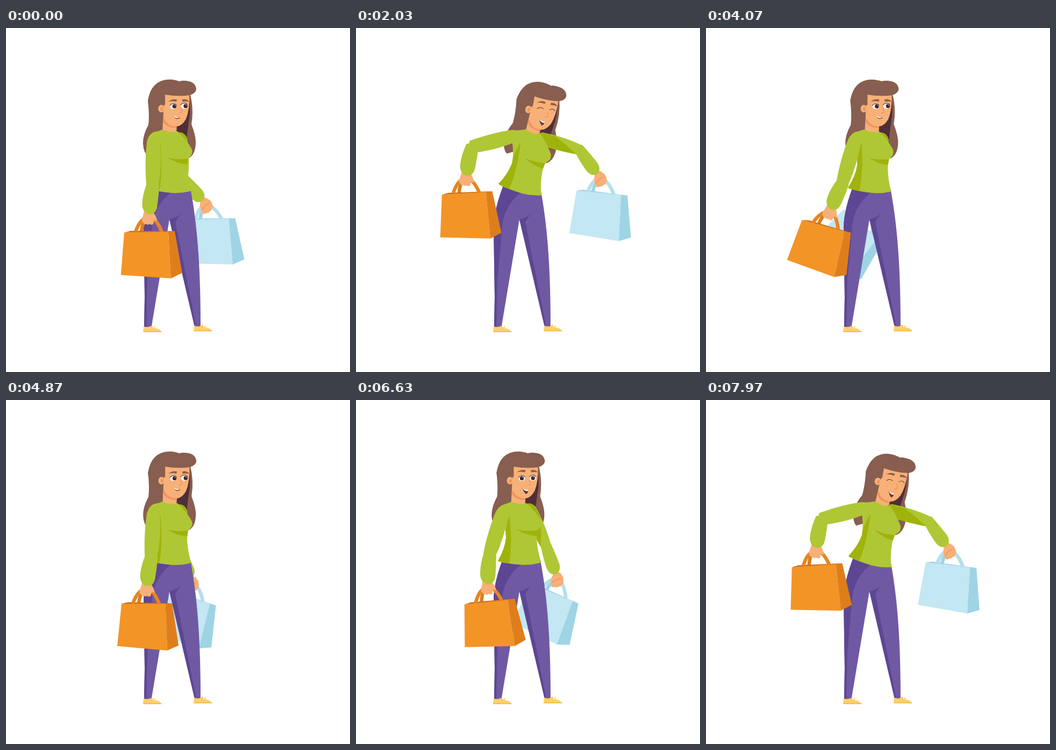
Animation of 640x640 px, one loop 8 s. Source, as an HTML page:

```html
<!DOCTYPE html>
<html lang="en">
<head>
<meta charset="utf-8">
<title>Shopper with two bags</title>
<style>
  html, body { margin: 0; width: 100%; height: 100%; overflow: hidden; background: #fff; }
  svg { display: block; width: 100vw; height: 100vh; }
  .hair { fill: #875e50; }
  .hairDark { fill: #4f2e3a; }
  .skin { fill: #f7b077; }
  .blush { fill: #f0935f; }
  .green { fill: #afc735; }
  .greenDark { fill: #a0b30a; }
  .purple { fill: #7059a3; }
  .purpleDark { fill: #5d4693; }
  .shoe { fill: #ffd069; }
  .ink { fill: #3d2232; }
  .line { fill: none; stroke-linecap: round; stroke-linejoin: round; }
  .crease { stroke: #ea8f5a; stroke-width: 1.2; }
  .lid { stroke: #6f4637; stroke-width: 1.2; }
  .strap { fill: none; stroke-width: 6.5; }
</style>
</head>
<body>
<svg viewBox="0 0 640 640">
  <defs>
    <g id="shoe">
      <path class="shoe" d="M256 555Q264 559 271 554L274 558Q286 559 289 565L255 565Z"/>
      <path class="line" stroke="#f3b13f" stroke-width="1.3" d="M256 565H289M270 557L272 554M275 558L277 555"/>
    </g>
  </defs>

  <g id="blueBag">
    <path class="strap" stroke="#9fd4e5" stroke-width="5" d="M-12 23Q-9 4 -2 -2"/>
    <path fill="#9fd4e5" d="M-42 24L-30 21L53 23L41 24Z"/>
    <path fill="#c3e7f3" d="M-42 24L41 23L46 109L-47 104Z"/>
    <path fill="#9fd4e5" d="M41 23L53 23L68 100L46 109Z"/>
    <path class="strap" stroke="#b4dfec" d="M-21 24Q-14 -3 1 -3Q15 -1 28 24"/>
  </g>

  <g id="head">
    <path class="hair" d="M303 96Q270 97 264 135Q267 162 265 180Q254 200 255 216Q256 232 264 238L300 220L335 214L338 243Q353 237 353 212Q353 200 345 179Q350 150 342 120L320 98Z"/>
    <path class="hairDark" d="M339 125Q345 150 340 175Q337 195 336 210L317 192L317 180Q338 172 339 125Z"/>
    <path class="skin" d="M293 155L291 194Q305 202 317 195L318 178Z"/>
    <path class="blush" d="M293 166Q300 184 318 183L317 186Q300 186 293 175Z"/>
    <path class="skin" d="M295 122L341 124Q342 152 335 169Q328 182 318 183Q302 181 293 164Z"/>
    <ellipse class="skin" cx="289" cy="150" rx="5.8" ry="7"/>
    <ellipse class="blush" cx="290" cy="150.5" rx="2.4" ry="3.6"/>
    <path class="hair" d="M265 143L296 143L296 124Q320 128 342 125Q354 121 354 113Q352 98 330 98Q323 98 321 100Q312 95 303 96Q272 97 264 135Z"/>
    <g id="brows" class="hair">
      <path d="M302 137Q309 131 318 133L317 137Q309 135 302 137Z"/>
      <path d="M328 133Q336 131 341 137Q335 136 328 137Z"/>
    </g>
    <g id="openEyes">
      <ellipse cx="311" cy="145.5" rx="6" ry="5.2" fill="#fff"/>
      <ellipse cx="331.5" cy="145" rx="6" ry="5.2" fill="#fff"/>
      <path class="line lid" d="M305 144Q310 138 317 143M325 143Q331 137 337 142"/>
      <g id="pupils">
        <circle class="ink" cx="313.3" cy="145.7" r="3.7"/>
        <circle class="ink" cx="334" cy="145.2" r="3.7"/>
        <circle cx="314.5" cy="144" r=".8" fill="#fff"/>
        <circle cx="335" cy="143.5" r=".8" fill="#fff"/>
      </g>
    </g>
    <path id="shutEyes" class="line lid" d="M305 145.5Q310 140 316 144M328 144Q334 139 338 144"/>
    <path class="line crease" d="M325 149L327 157L322 158.5"/>
    <g id="smile">
      <path fill="#fff" d="M313 163Q317 166 323 167L321 169Q315 169 313 163Z"/>
      <path class="line" stroke="#6d2f2f" stroke-width="1.3" d="M315 167Q319 170 323 167"/>
    </g>
    <g id="laugh">
      <path fill="#6b3a35" d="M312 163Q317 167 323 167Q323 174 318.500 175Q314 171 312 163Z"/>
      <path fill="#fff" d="M312 163Q317 167 323 167L322.500 169.500Q315 170 312 163Z"/>
    </g>
  </g>

  <g id="rightHand">
    <path class="skin" d="M-6 -16Q0 -19 6 -15L11 -8Q13 0 11 6L8 7Q8 11 3 10Q0 13 -4 11Q-10 13 -11 8Q-13 0 -10 -7Z"/>
    <path class="line crease" d="M-9 3Q-2 -4 7 -4"/>
  </g>
  <g id="rightUpper">
    <path class="green" d="M-8 -10Q-12 40 -9 75L10 75Q17 40 15 0Q8 -16 -8 -10Z"/>
    <path class="greenDark" d="M-8 -10Q8 -16 14 -2L14 24Q4 48 -9 71Q-12 40 -8 -10Z"/>
  </g>
  <g id="rightFore">
    <path class="green" d="M-9 0Q-12 25 -11 42Q-9 55 1 56Q13 55 14 40Q13 20 10 -5Q0 -9 -9 0Z"/>
  </g>

  <path class="purple" d="M277 286Q257 335 256 370L258 500L257 556Q264 558 271 554L304 356L351 556Q357 558 362 554Q362 430 351 348Q347 318 343 298Z"/>
  <path class="purpleDark" d="M277 286Q257 335 256 370L258 500L257 556L261 556L263 470L271 380Q272 330 312 302Z"/>
  <path class="purpleDark" d="M304 356Q316 353 325 346Q319 353 315 361L354 556L351 556Z"/>
  <use href="#shoe"/>
  <use href="#shoe" x="94" y="-1.5"/>

  <g id="torso">
    <path class="green" d="M291 189Q305 196 319 192Q335 207 345 224Q350 235 338 243Q336 258 338 272Q340 290 345 303Q322 309 300 306Q281 304 264 299Q278 275 280 255Q279 235 270 212Q267 196 280 193Z"/>
    <path class="greenDark" d="M287 214Q278 240 280 255Q278 275 264 299Q275 303 285 304Q292 270 287 214Z"/>
    <path class="greenDark" d="M300 241Q318 246 339 243L337 254Q317 252 300 241Z"/>
  </g>

  <g id="orangeBag">
    <path class="strap" stroke="#de7e1b" stroke-width="5" d="M-14 23Q-12 6 -5 -2"/>
    <path fill="#c96d12" d="M-46 25L-34 22L48 22L36 24Z"/>
    <path fill="#f39427" d="M-46 25L36 23L41 110L-52 104Z"/>
    <path fill="#de7e1b" d="M36 23L48 22L62 100L41 110Z"/>
    <path class="strap" stroke="#e68521" d="M-25 24Q-16 -3 1 -4Q13 -3 24 24"/>
  </g>
  <g id="leftHand">
    <path class="skin" d="M-9 -15L6 -15Q14 -6 15 2Q14 5 10 1L8 9Q4 12 1 9Q-2 12 -5 9Q-9 11 -10 7Q-15 4 -12 -3Z"/>
  </g>
  <g id="leftUpper">
    <path class="green" d="M10 -17Q-9 -18 -13 4Q-16 42 -11 84Q0 90 12 84Q18 40 9 -8Z"/>
  </g>
  <g id="leftFore">
    <path class="green" d="M-10 -3Q-17 22 -15 40Q-12 54 0 55Q12 54 13 39Q14 20 13 0Q2 -9 -10 -3Z"/>
  </g>
</svg>
<script>
const LOOP = 8000, CYCLE = 6000;
const LAUGH = { from: 1100, to: 3600 };

// Key poses: time, body lean, then upper arm and forearm angles, left and right
const POSES = [
  [0, 0, 2, 5.5, -5, -40],        // rest
  [630, -2, 18, 2, -26, -18],     // arms part
  [2030, 25, 77, 9, -76, -35],    // arms lifted
  [2540, 31, 65, 21, -60, -38],   // lean on
  [3170, 34, 45, 43, -5, -24],    // twist
  [4070, 3.5, 17, 22, 8, 10],     // swing behind
  [5050, 0, 3, 6, -2, -28],       // settle
  [5670, 0, 2, 6, -5, -47]        // swing out
];

const parts = {};
document.querySelectorAll('svg > g, #head [id]').forEach(el => parts[el.id] = el);

const clamp = x => Math.min(1, Math.max(0, x));

const pose = i => {
  const n = POSES.length, turn = Math.floor(i / n), [at, ...rest] = POSES[i - turn * n];
  return [at + turn * CYCLE, ...rest];
};

// Monotone cubic through the poses, wrapping around the cycle
function sample(time) {
  const i = POSES.findLastIndex(p => p[0] <= time);
  const [a, b, c, d] = [i - 1, i, i + 1, i + 2].map(pose);
  const span = c[0] - b[0], u = (time - b[0]) / span;
  const slope = (p, q, k) => (q[k] - p[k]) / (q[0] - p[0]);
  const tangent = (s, t) => s * t <= 0 ? 0 : 2 * s * t / (s + t);
  return b.slice(1).map((from, j) => {
    const k = j + 1, s = slope(b, c, k);
    const start = tangent(slope(a, b, k), s) * span;
    const end = tangent(s, slope(c, d, k)) * span;
    return from + (c[k] - from) * u * u * (3 - 2 * u)
      + start * u * (1 - u) ** 2 - end * u * u * (1 - u);
  });
}

const place = (id, [x, y], angle) =>
  parts[id].setAttribute('transform', `translate(${x} ${y}) rotate(${angle})`);
const show = (id, on) => parts[id].style.display = on ? '' : 'none';
const reach = ([x, y], length, angle) => {
  const r = angle * Math.PI / 180;
  return [x - length * Math.sin(r), y + length * Math.cos(r)];
};

function drawArm(side, [x, y], [upperLength, foreLength], upper, fore, wrist, bagId, bag) {
  // A lifted arm raises its shoulder
  const shoulder = [x, y - Math.abs(upper) * .04];
  const elbow = reach(shoulder, upperLength, upper);
  const hand = reach(elbow, foreLength, fore);
  place(side + 'Upper', shoulder, upper);
  place(side + 'Fore', elbow, fore);
  place(side + 'Hand', hand, fore + wrist);
  place(bagId, hand, bag);
}

function drawFace(time) {
  const laughing = time > LAUGH.from && time < LAUGH.to;
  const lift = clamp((time - 200) / 400) * clamp((LAUGH.to + 300 - time) / 400);
  show('openEyes', !laughing);
  show('shutEyes', laughing);
  show('smile', lift < .4);
  show('laugh', lift >= .4);
  parts.brows.setAttribute('transform', `translate(0 ${-2.5 * lift})`);
  parts.pupils.setAttribute('transform', `translate(${-2.2 * lift} 0)`);
}

function draw(now) {
  const time = now % LOOP % CYCLE;
  const [lean, leftUpper, leftFore, rightUpper, rightFore] = sample(time);
  const tilt = lean * .0085, sink = lean * lean / 250;
  const turn = Math.max(0, (lean + leftUpper - 20) / 8);

  // The torso shears around the hips
  const onTorso = (x, y) => {
    const up = (303 - y) / 114;
    return [x + lean * up, y + tilt * (x - 305) + sink * up];
  };
  const [e, f] = onTorso(0, 0);
  parts.torso.setAttribute('transform',
    `matrix(1 ${tilt} ${-lean / 114} ${1 - sink / 114} ${e} ${f})`);
  parts.head.setAttribute('transform',
    `translate(${lean * 1.27} ${sink * .6}) rotate(${turn} 289 150)`);

  // Bags follow the forearms; the body twist holds the blue one back
  const orange = leftFore * 1.05 - leftUpper * .08 - 5.5;
  const blue = rightFore + 41 - leftFore * .5 + leftUpper * .06;
  drawArm('left', onTorso(275, 209), [83, 64], leftUpper, leftFore, -5, 'orangeBag', orange);
  drawArm('right', onTorso(322, 206), [74, 69], rightUpper, rightFore, 19, 'blueBag', blue);
  drawFace(time);
}

const start = performance.now();
function tick() {
  draw(performance.now() - start);
  requestAnimationFrame(tick);
}
tick();
</script>
</body>
</html>
```
